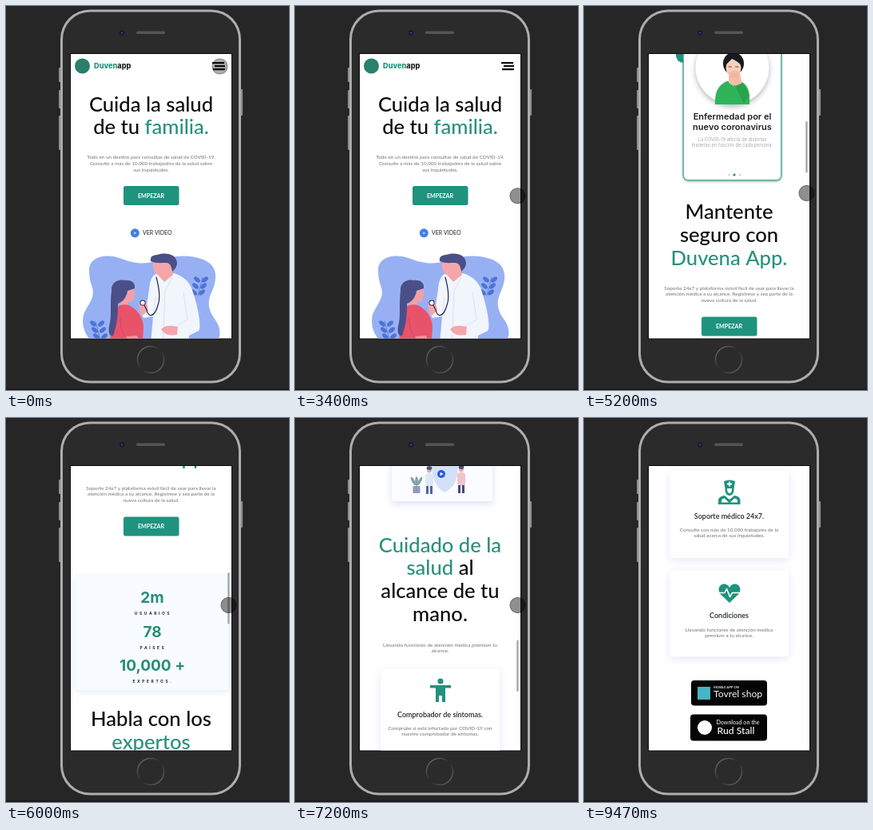
Animation of 354 by 480 pixels, one loop 9790 ms. Source, as an HTML page with a canvas:

```html
<!DOCTYPE html>
<html lang="es">
<head>
<meta charset="utf-8">
<style>
  html, body { margin: 0; width: 100%; height: 100%; overflow: hidden; background: #262626; }
  canvas { display: block; width: 354px; height: 480px; }
</style>
</head>
<body>
<canvas id="stage"></canvas>
<script>
const LOOP = 9790, STEP = 200 / 3;
const GREEN = '#1f937e', SKIN = '#f5a6aa', NAVY = '#4b4f88', MID = 181.5;
const SANS = 'Lato, "Open Sans", sans-serif', BLOCK = 'Inter, Roboto, sans-serif';
const SCROLL = [[3600, 0], [4200, 206], [5200, 455], [6000, 720], [7200, 1176], [8600, 1546]];

const canvas = document.getElementById('stage');
const ctx = canvas.getContext('2d');
const dpr = window.devicePixelRatio || 1;
canvas.width = 354 * dpr;
canvas.height = 480 * dpr;

const clamp = (v, a = 0, b = 1) => Math.min(b, Math.max(a, v));
const part = (t, a, b) => clamp((t - a) / (b - a));
const ease = p => p * p * (3 - 2 * p);
const mix = (a, b, p) => a + (b - a) * p;

function fill(color, d) {
  ctx.fillStyle = color;
  ctx.fill(new Path2D(d));
}
function line(color, width, d) {
  ctx.strokeStyle = color;
  ctx.lineWidth = width;
  ctx.lineCap = ctx.lineJoin = 'round';
  ctx.stroke(new Path2D(d));
}
function oval(color, x, y, rx, ry = rx, turn = 0) {
  ctx.fillStyle = color;
  ctx.beginPath();
  ctx.ellipse(x, y, rx, ry, turn, 0, 7);
  ctx.fill();
}
function box(color, x, y, w, h, r = 0) {
  ctx.fillStyle = color;
  ctx.beginPath();
  ctx.roundRect(x, y, w, h, r);
  ctx.fill();
}
function shaded(color, blur, dy, draw) {
  ctx.save();
  ctx.shadowColor = color;
  ctx.shadowBlur = blur * dpr;
  ctx.shadowOffsetY = dy * dpr;
  draw();
  ctx.restore();
}
function text(str, x, y, font, color, align = 'center', gap = 0) {
  ctx.font = font;
  ctx.fillStyle = color;
  ctx.textAlign = align;
  ctx.letterSpacing = gap + 'px';
  ctx.fillText(str, x, y);
  ctx.letterSpacing = '0px';
}
// Centred line made of differently coloured pieces.
function runs(pieces, font, y, x) {
  ctx.font = font;
  const total = pieces.reduce((w, [s]) => w + ctx.measureText(s).width, 0);
  let left = x ?? MID - total / 2;
  for (const [s, color] of pieces) {
    text(s, left, y, font, color, 'left');
    left += ctx.measureText(s).width;
  }
}
const heading = (y, ...pieces) => runs(pieces, `500 25.6px ${SANS}`, y);
const small = (y, str) => text(str, MID, y, `6.35px ${SANS}`, '#77716f');

function button(y) {
  box(GREEN, 147, y, 69.5, 24, 2.5);
  text('EMPEZAR', MID, y + 14.6, `700 7.1px ${SANS}`, '#fff');
}

function hero() {
  oval('#2a7f6d', 95.5, 75, 9.5);
  runs([['Duven', GREEN], ['app', '#222']], `800 9.2px ${BLOCK}`, 78, 110);
  box('#111', 258, 70, 15, 2.2);
  box('#111', 261, 74, 13, 2.2);
  box('#111', 259, 78, 15, 2.2);

  heading(131.5, ['Cuida la salud', '#0c0c0c']);
  heading(160, ['de tu ', '#0c0c0c'], ['familia.', '#2a917e']);
  small(191, 'Todo en un destino para consultas de salud de COVID-19.');
  small(199, 'Consulte a más de 10.000 trabajodres de la salud sobre');
  small(207, 'sus inquietudes.');
  button(225);
  oval('#3f80e6', 161.3, 283.8, 5.5);
  fill('#cfe0ff', 'M160.3 282.2L163.2 283.8L160.3 285.4Z');
  text('VER VIDEO', 171, 286.3, `7px ${SANS}`, '#222', 'left');
}

function leaves(x, y, lean) {
  line('#4d72d6', 0.7, `M${x} ${y + 13}L${x + lean * 6} ${y - 10}`);
  for (let i = 0; i < 6; i++) {
    const side = i % 2 ? 1 : -1, up = (i >> 1) * 8;
    oval('#4d72d6', x + lean * up * 0.25 + side * 5, y + 9 - up, 4.6, 2.5, side * -0.7);
  }
}

function consultation() {
  fill('#97b0f4', 'M104 124C104 108 124 103 142 109C160 116 172 118 190 112C208 106 228 104 247 111C266 119 264 136 258 150C250 166 254 176 263 188C272 203 268 219 246 219C228 219 220 227 182 227C150 227 140 222 124 220C102 217 93 196 97 180C101 168 112 160 108 146C105 138 104 132 104 124Z');
  leaves(118, 198, -1);
  leaves(240, 143, 1);

  fill('#f1f5fc', 'M190 128C182 130 180 138 179 148L176 168L168 176L172 184L184 182L180 227L228 227L229 206L241 200C245 195 240 170 234 152C230 138 222 132 210 128Z');
  line('#d3def3', 0.8, 'M184 182L187 158M222 152L227 186L214 194M208 133L199 150L196 227');
  fill(SKIN, 'M190 118L207 120L209 130L198 139L189 129Z');
  fill(SKIN, 'M184 111C183 124 186 130 194 131C204 131 210 124 209 112L200 108Z');
  fill(NAVY, 'M181 113C180 104 188 106 193 104C204 102 214 106 214 116C213 122 210 124 208 126C207 120 206 116 201 115C194 115 187 116 181 113Z');
  fill(SKIN, 'M194 198C200 192 208 194 215 195L214 205C206 206 199 206 194 198Z');

  fill('#f2a0a6', 'M149 148L160 147C162 154 161 162 156 164L152 164L153 172L143 171L143 158Z');
  fill('#e8536a', 'M138 171C146 165 154 167 160 172C168 178 172 188 172 196L170 227L130 227C131 210 130 180 138 171Z');
  line('#cf4160', 0.8, 'M143 184C143 200 147 208 156 211');
  fill('#f5929c', 'M150 207L164 206L170 221L160 226Z');
  fill(NAVY, 'M132 150C131 140 140 135 148 137C158 136 162 141 161 147L152 150C151 158 146 164 140 166C140 176 140 190 134 206C129 208 127 200 130 190C132 178 130 166 132 150Z');

  fill(SKIN, 'M166 166L176 164L178 175L169 182Z');
  line('#23264a', 1.2, 'M188 133C192 148 193 160 190 168C186 183 178 184 176 174L172 166');
  oval('#23264a', 171, 165, 3.6);
  oval('#fff', 171, 165, 2.6);
}

function woman(covering) {
  oval('#171a20', 185.5, 306, 7.5, 5);
  oval('#171a20', 187, 321, 13, 14);
  fill('#2fb457', 'M164 372C163 352 172 346 179 343L195 343C203 346 208 352 207 372Z');
  fill('#f4bfa8', 'M181 334H193V345L187 349L181 345Z');
  oval('#f9cfbb', 187, 326, 9.5, 12);
  fill('#171a20', 'M176 324C177 312 184 309 191 311C197 313 199 318 198 325C194 319 189 317 185 315C182 318 179 321 176 324Z');
  line('#3a2a2a', 0.8, 'M181 325H184.5M189.5 325H193');
  if (covering) {
    fill('#f5bca5', 'M181 332C186 328 193 329 195 333L198 348L191 351L183 340Z');
    line('#dd9c88', 0.6, 'M183 333L193 335M184 336L193 338');
    fill('#28a24d', 'M189 349L199 345L207 360L200 371Z');
  } else {
    oval('#9b3f3f', 186, 332.5, 1.8, 2.2);
    fill('#f5bca5', 'M192 340C195 333 200 337 199 342L201 352L194 356Z');
    line('#1f8e43', 0.8, 'M174 356L181 366M193 356L199 368');
  }
}

function illness(t) {
  box(GREEN, 115, 270, 24, 50, 9);
  shaded('rgba(20,110,90,.5)', 3, 1, () => box('#5fae9e', 123.5, 249.5, 124, 218, 7));
  box('#fff', 125, 251, 121, 215, 5.5);
  shaded('rgba(0,0,0,.28)', 6, 3, () => oval('#fff', 185.5, 326, 46));
  woman(Math.floor(t / 600) % 2 === 0);
  const bold = `600 11px ${BLOCK}`, fine = `5.5px ${BLOCK}`;
  text('Enfermedad por el', 185.5, 391, bold, '#202020');
  text('nuevo coronavirus', 185.5, 404, bold, '#202020');
  text('La COVID-19 afecta de distintas', 185.5, 418, fine, '#a8a8a8', 'center', 0.1);
  text('maneras en función de cada persona.', 185.5, 425.2, fine, '#a8a8a8', 'center', 0.1);
  oval('#bbb', 181.5, 460, 1);
  oval(GREEN, 188, 460, 1.6);
  oval('#bbb', 195, 460, 1);
}

function safety() {
  heading(266, ['Mantente', '#0c0c0c']);
  heading(295, ['seguro con', '#0c0c0c']);
  heading(324, ['Duvena App.', '#2a917e']);
  small(355, 'Soporte 24x7 y plataforma móvil fácil de usar para llevar la');
  small(362.4, 'atención médica a su alcance. Regístrese y sea parte de la');
  small(370, 'nueva cultura de la salud.');
  button(388.5);
}

function stat(y, value, label) {
  text(value, 183, y, `700 19px ${BLOCK}`, '#268c79');
  text(label, 184, y + 15, `700 4.9px ${BLOCK}`, '#222', 'center', 2.6);
}

function numbers() {
  shaded('rgba(110,140,230,.2)', 10, 2, () => box('#f8fbff', 87, 198, 191, 142, 3));
  stat(231, '2m', 'USUARIOS');
  stat(273.5, '78', 'PAÍSES');
  stat(316, '10,000 +', 'EXPERTOS.');
  heading(384.5, ['Habla con los', '#0c0c0c']);
  heading(413.5, ['expertos', '#2a917e']);
  small(444, 'Llevando funciones de atención medica premium a');
  small(451.5, 'tu alcance.');
}

function figure(x, y, top, legs) {
  oval('#e9a9a4', x, y, 3, 3.6);
  oval('#47507f', x, y - 2.4, 3.4, 2.3);
  box(top, x - 5, y + 4, 10, 17, 4);
  box(legs, x - 4, y + 20, 3, 10);
  box(legs, x + 1, y + 20, 3, 10);
}

function video() {
  shaded('rgba(90,110,200,.22)', 9, 3, () => box('#fbfcff', 121, 36, 126, 68, 2));
  fill('#d3e0f7', 'M171 56C179 56 184 51 187 49C191 53 198 56 204 56C204 78 199 87 187 93C176 87 171 75 171 56Z');
  for (let i = -1; i < 2; i++) oval('#7fa29f', 152 + i * 4, 79, 1.8, 6, i * 0.5);
  box('#8f9ac4', 147.5, 85, 9, 9, 1);
  figure(168, 65, '#dfe6f6', '#52659c');
  figure(208, 64, '#efc5cb', '#454b79');
  oval('#2f5bd0', 183, 70, 5);
  fill('#fff', 'M181.6 67.8L185.6 70L181.6 72.2Z');
}

function card(top, height, title, first, second) {
  shaded('rgba(100,120,230,.17)', 11, 3, () => box('#fff', 107.5, top, 148.5, height, 2));
  text(title, MID, top + 59.5, `600 9px ${SANS}`, '#1d2528');
  small(top + 76, first);
  small(top + 83.4, second);
}

function care() {
  heading(167.5, ['Cuidado de la', '#2a917e']);
  heading(196, ['salud', '#2a917e'], [' al', '#0c0c0c']);
  heading(225, ['alcance de tu', '#0c0c0c']);
  heading(254, ['mano.', '#0c0c0c']);
  small(286, 'Llevando funciones de atención medica premium tu');
  small(293.4, 'alcance.');
  card(314, 107, 'Comprobador de síntomas.', 'Comprube si está infectado por COVID-19 con', 'nuestro comprobador de síntomas.');
  oval(GREEN, 182, 329, 3.6);
  fill(GREEN, 'M169 334H195V337.5H188V355H184V347H180V355H176V337.5H169Z');
}

function medicIcon() {
  fill(GREEN, 'M175 79Q182 76 189 79L187.5 89C188 94 185 97 182 97C179 97 176 94 176.5 89Z');
  fill('#fff', 'M181 79.5H183V81.5H185V83.5H183V85.5H181V83.5H179V81.5H181ZM179 88H185C185 92 184 94 182 94C180 94 179 92 179 88Z');
  fill(GREEN, 'M168 108V103C168 99 173 97 176 97L182 102L188 97C191 97 195.5 99 195.5 103V108Z');
  fill('#fff', 'M172 105.5V103.5C172 101.5 174 100.5 176 100.5L181 105.5ZM183 105.5L188 100.5C190 100.5 192 101.5 192 103.5V105.5Z');
}

function badge(x, y, w, h) {
  box('#050505', x, y, w, h, 4);
}

function closing() {
  card(66, 109, 'Soporte médico 24x7.', 'Consulte con más de 10.000 trabajores de la', 'salud acerca de sus inquietudes.');
  medicIcon();
  card(190.5, 107.5, 'Condiciones', 'Llevando funciones de atención medica', 'premium a tu alcance.');
  fill(GREEN, 'M182 231L170.5 220C166 214 170 207 175.5 207.5C179 207.5 181 210 182 212C183 210 185 207.5 188.5 207.5C194 207 198 214 193.5 220Z');
  line('#fff', 1.6, 'M169 218.5H176L178.5 213.5L182.5 223.5L185.5 218.5H195');

  badge(134, 328, 95, 31.5);
  box('#43b5c4', 142, 336, 16, 16);
  text('MOBILE APP ON', 162, 337.5, `700 4.1px ${SANS}`, '#eee', 'left');
  text('Tovrel shop', 162, 349.3, `12.2px ${SANS}`, '#f4f4f4', 'left');
  badge(133, 370.5, 96, 33);
  oval('#fff', 151, 387, 9);
  text('Download on the', 165.5, 383.3, `7.1px ${SANS}`, '#fff', 'left');
  text('Rud Stall', 166.5, 395.2, `500 12.2px ${SANS}`, '#fff', 'left');
}

function phone() {
  box('#262626', 0, 0, 354, 480);
  box('#1d1a1d', 0, 478, 354, 2);
  for (const [x, y, h] of [[66, 77, 18], [66, 105, 23], [66, 137, 43], [293.5, 104, 33]]) box('#8b8b8b', x, y, 2.6, h, 1);
  box('#adadad', 68, 4.5, 226, 467, 37);
  box('#2b2b2b', 71, 7.5, 220, 461, 34);
  oval('#15151f', 145, 33.5, 3);
  oval('#33368a', 145, 33.5, 1.6);
  box('#555', 163, 31.5, 36, 3.4, 1.7);
  const ring = ctx.createLinearGradient(169, 430, 193, 454);
  ring.addColorStop(0, '#626262');
  ring.addColorStop(0.5, '#262626');
  ring.addColorStop(1, '#5c5c5c');
  ctx.strokeStyle = ring;
  ctx.lineWidth = 1.5;
  ctx.beginPath();
  ctx.arc(181, 442, 16.5, 0, 7);
  ctx.stroke();
  box('#0a0a0a', 80, 59, 203, 357.5);
}

function scrollAt(t) {
  const last = SCROLL.length - 1;
  if (t <= SCROLL[0][0]) return 0;
  if (t >= SCROLL[last][0]) return SCROLL[last][1];
  const slope = i => (SCROLL[i + 1][1] - SCROLL[i][1]) / (SCROLL[i + 1][0] - SCROLL[i][0]);
  const speed = i => i === 0 || i === last ? 0 : (slope(i - 1) + slope(i)) / 2;
  const i = SCROLL.findIndex(k => k[0] > t) - 1;
  const [t0, a] = SCROLL[i], [t1, b] = SCROLL[i + 1];
  const d = t1 - t0, p = (t - t0) / d, q = 1 - p;
  return mix(a, b, ease(p)) + d * p * q * (q * speed(i) - p * speed(i + 1));
}

function menu(t) {
  const open = ease(part(t, 1430, 2000)) - ease(part(t, 2420, 2980));
  if (open <= 0) return;
  const x = 282 - 131 * open;
  box(GREEN, x, 60, 132, 356);
  ['INICIO', 'CARACTERISTICAS', 'APOYO', 'CONTACTENOS'].forEach((item, i) =>
    text(item, x + 76, 173.5 + i * 44.5, `8.7px ${SANS}`, '#fff'));
}

function pointer(t) {
  if (t > 9320) return;
  const go = ease(part(t, 2880, 3420)), leave = ease(part(t, 8700, 9320));
  const x = mix(mix(267.5, 278.5, go), -14, leave);
  const y = mix(mix(75.5, 238, go) - 4 * part(t, 4300, 4900), 474, leave);
  const press = t > 1400 ? 0.44 : 0.32;
  const glow = ctx.createRadialGradient(x, y, 0, x, y, 10.5);
  glow.addColorStop(0, `rgba(0,0,0,${press})`);
  glow.addColorStop(0.8, `rgba(0,0,0,${press})`);
  glow.addColorStop(0.9, `rgba(0,0,0,${press + 0.15})`);
  glow.addColorStop(1, 'rgba(0,0,0,0)');
  oval(glow, x, y, 10.5);
}

function draw(t) {
  ctx.setTransform(dpr, 0, 0, dpr, 0, 0);
  phone();
  ctx.save();
  ctx.beginPath();
  ctx.rect(81, 60, 201, 355.5);
  ctx.clip();
  box('#fff', 81, 60, 201, 356);
  const top = scrollAt(t);
  const sections = [[0, hero], [206, consultation], [206, illness], [455, safety],
    [720, numbers], [1176, video], [1176, care], [1546, closing]];
  for (const [offset, paint] of sections) {
    ctx.save();
    ctx.translate(0, offset - top);
    paint(t);
    ctx.restore();
  }
  menu(t);
  if (t > 3600) {
    ctx.globalAlpha = 1 - part(t, 8900, 9250);
    box('#a3a3a3', 277.3, 60 + top * 0.185, 2.2, 64.5, 1.1);
  }
  ctx.restore();
  pointer(t);
}

function tick() {
  const t = performance.now() % LOOP;
  draw(Math.floor((t + 5) / STEP) * STEP);
  requestAnimationFrame(tick);
}
tick();
</script>
</body>
</html>
```
